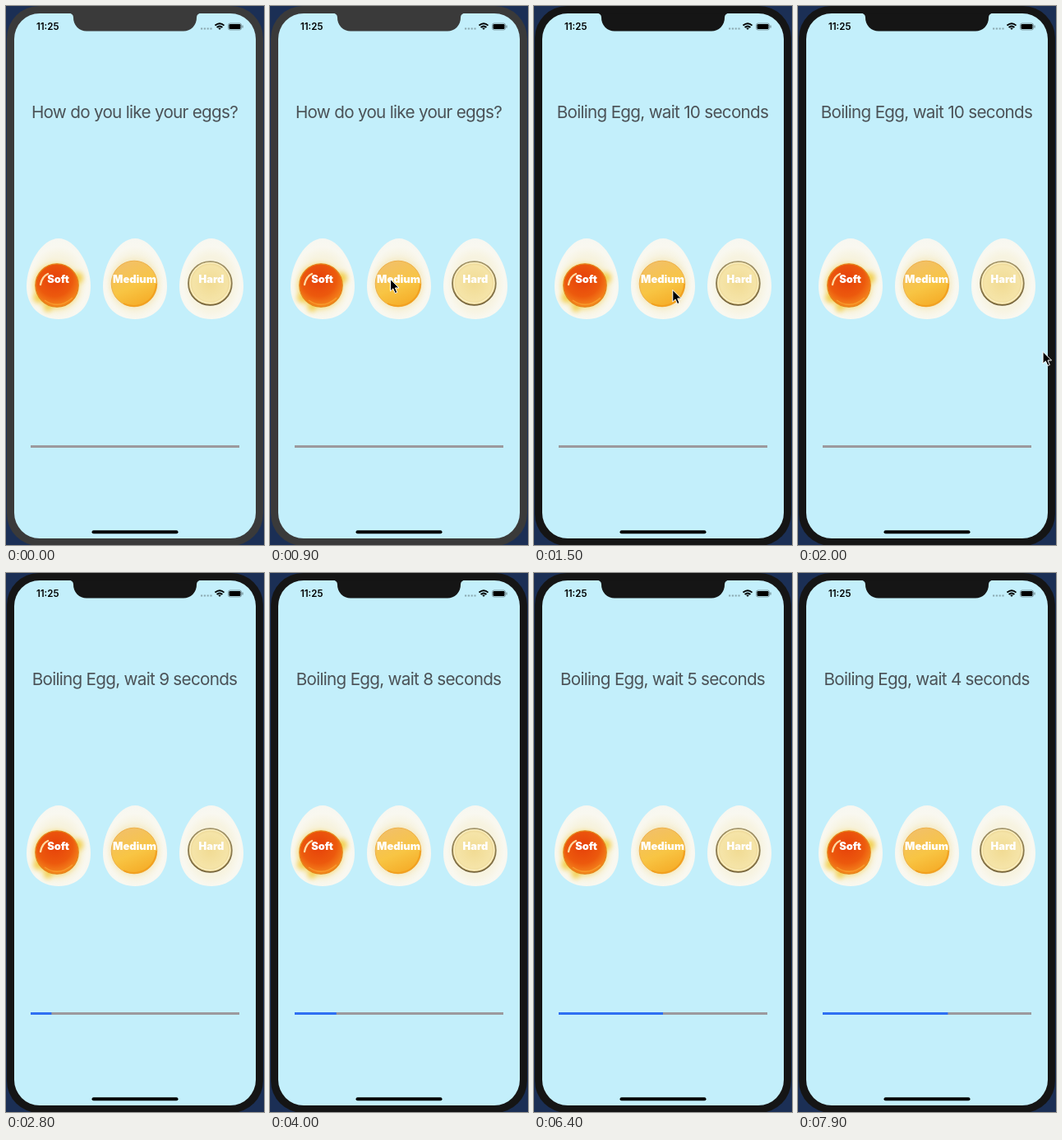
An HTML page that plays this animation: 314x654 px, repeating every 8000 ms.

```html
<!DOCTYPE html>
<html lang="en">
<head>
<meta charset="utf-8">
<title>Egg timer</title>
<style>
  html, body { margin: 0; width: 314px; height: 654px; overflow: hidden; background: #1b2f55; }
  svg { display: block; }
  text { font-family: Inter, "Open Sans", sans-serif; text-anchor: middle; }
  #title { font-size: 20.7px; letter-spacing: -.72px; fill: #4b5257; }
  .label { font-size: 12.9px; font-weight: 900; fill: #fff; }
  .clock { font-size: 11.5px; font-weight: 600; }
</style>
</head>
<body>
<svg width="314" height="654" viewBox="0 0 314 654">
  <defs>
    <path id="egg" d="M0 0C20 0 39 31 39 58C39 83 22 98 0 98S-39 83-39 58C-39 31-20 0 0 0Z"/>
    <radialGradient id="white" cy=".55" r=".55">
      <stop offset=".6" stop-color="#f7f3e0"/><stop offset=".82" stop-color="#f9f8f0"/><stop offset="1" stop-color="#f7f7f1"/>
    </radialGradient>
    <radialGradient id="soft" cx=".45" cy=".35" r=".68">
      <stop offset="0" stop-color="#e6400a"/><stop offset=".6" stop-color="#ec590d"/><stop offset="1" stop-color="#f68e20"/>
    </radialGradient>
    <linearGradient id="medium" x1=".3" x2=".7" y2="1">
      <stop offset="0" stop-color="#f2c068"/><stop offset=".55" stop-color="#f8c544"/><stop offset="1" stop-color="#f5ab26"/>
    </linearGradient>
    <radialGradient id="hard">
      <stop offset="0" stop-color="#f1db93"/><stop offset=".8" stop-color="#f5e4a8"/><stop offset="1" stop-color="#ead390"/>
    </radialGradient>
    <linearGradient id="rim" x2="0" y2="1">
      <stop offset="0" stop-color="#a3956a"/><stop offset="1" stop-color="#75633a"/>
    </linearGradient>
    <filter id="blur" x="-50%" y="-50%" width="200%" height="200%"><feGaussianBlur stdDeviation="3"/></filter>
    <clipPath id="eggClip"><use href="#egg"/></clipPath>
  </defs>

  <g id="bezel">
    <rect x="1" y="0" width="312" height="655" rx="39"/>
    <rect x="10" y="9" width="294" height="637" rx="31" fill="#c3effb"/>
    <path d="M76 8.5Q82 9 82 14A16 16 0 0 0 98 30.5H216A16 16 0 0 0 232 14Q232 9 238 8.5Z"/>
  </g>

  <text class="clock" x="50.7" y="29">11:25</text>
  <path d="M237 27.5h14" stroke="#8ba9b1" stroke-width="2" stroke-dasharray="2.2 1.6"/>
  <g fill="none" stroke="#000" stroke-width="1.9">
    <path d="M254.5 23.6Q260 18.8 265.5 23.6M256.6 26Q260 23 263.4 26"/>
    <path d="M258 26.6H262L260 29Z" fill="#000" stroke="none"/>
  </g>
  <rect x="270.5" y="21" width="16" height="8" rx="2.2" fill="none" stroke="#6d868d" stroke-width=".8"/>
  <rect x="271.5" y="22" width="14" height="6" rx="1.2"/>
  <path d="M288 23.5v3" stroke="#6d868d" stroke-width="1.2"/>

  <text id="title" x="156.5" y="136"></text>

  <g transform="translate(64 282)">
    <use href="#egg" fill="url(#white)"/>
    <g clip-path="url(#eggClip)" fill="#f3cf4c">
      <g filter="url(#blur)">
        <circle cx="-3" cy="58" r="28" opacity=".6"/>
        <circle cx="-25" cy="72" r="6"/><circle cx="23" cy="48" r="7"/><circle cx="-13" cy="84" r="5"/>
      </g>
    </g>
    <circle cx="-2" cy="57" r="26.2" fill="url(#soft)" stroke="#e5851a" stroke-width="1.2"/>
    <path d="M-22 56Q-20 46-13 43" fill="none" stroke="#ffd9a0" stroke-width="2.4" stroke-linecap="round"/>
    <path d="M-17 75Q0 87 17 72" fill="none" stroke="#fbb13a" stroke-width="1.4" opacity=".6"/>
  </g>
  <g transform="translate(157 282)">
    <use href="#egg" fill="url(#white)"/>
    <circle cx="-1" cy="55" r="30" fill="#f3dfa0" opacity=".5" filter="url(#blur)"/>
    <circle cx="-1" cy="55" r="27.8" fill="url(#medium)" stroke="#eeb04a"/>
    <path d="M-14 79A27.5 27.5 0 0 0 26 55" fill="none" stroke="#f2a01e" stroke-width="1.8"/>
  </g>
  <g transform="translate(250 282)">
    <use href="#egg" fill="url(#white)"/>
    <circle cx="-1.6" cy="54.5" r="26.4" fill="url(#hard)" stroke="url(#rim)" stroke-width="1.8"/>
    <circle cx="-1.6" cy="54" r="24.4" fill="none" stroke="#fbf0c4" stroke-width="1.2"/>
  </g>
  <text class="label" x="63.5" y="336">Soft</text>
  <text class="label" x="156.5" y="336">Medium</text>
  <text class="label" x="250" y="336">Hard</text>

  <rect x="30" y="533" width="254" height="3" fill="#9c999d"/>
  <rect id="progress" x="30" y="533" height="3" fill="#2e6ff2"/>
  <rect x="104.5" y="636.3" width="105" height="4" rx="2"/>
  <path id="cursor" d="M0 0V14.5L3.3 11.4 5.8 17 8.3 16 5.9 10.5H10.5Z" stroke="#fff" stroke-width="1"/>
</svg>
<script>
  const LOOP = 8000, FOCUS = 1000, START = 1100, SECONDS = 10;
  const [bezel, title, progress, cursor] =
    ['bezel', 'title', 'progress', 'cursor'].map(id => document.getElementById(id));

  // Eased move between two points, with t clamped to the given span
  function move(t, begin, end, from, to) {
    const u = Math.min(1, Math.max(0, (t - begin) / (end - begin)));
    const k = u * u * (3 - 2 * u);
    return from.map((v, i) => v + (to[i] - v) * k);
  }

  function draw(t) {
    const elapsed = Math.max(0, Math.floor((t - START) / 1000));
    bezel.setAttribute('fill', t < FOCUS ? '#3a3a3a' : '#151515');
    title.textContent = t < START ? 'How do you like your eggs?'
      : `Boiling Egg, wait ${SECONDS - elapsed} seconds`;
    progress.setAttribute('width', 254 * elapsed / SECONDS);

    const [x, y] = t < 1300
      ? move(t, 100, 800, [318, 430], [146.5, 331.5])
      : move(t, 1300, 2190, [146.5, 331.5], [318, 431]);
    cursor.setAttribute('transform', `translate(${x} ${y})`);
  }

  function frame(now) {
    draw(now % LOOP);
    requestAnimationFrame(frame);
  }
  draw(0);
  requestAnimationFrame(frame);
</script>
</body>
</html>
```
